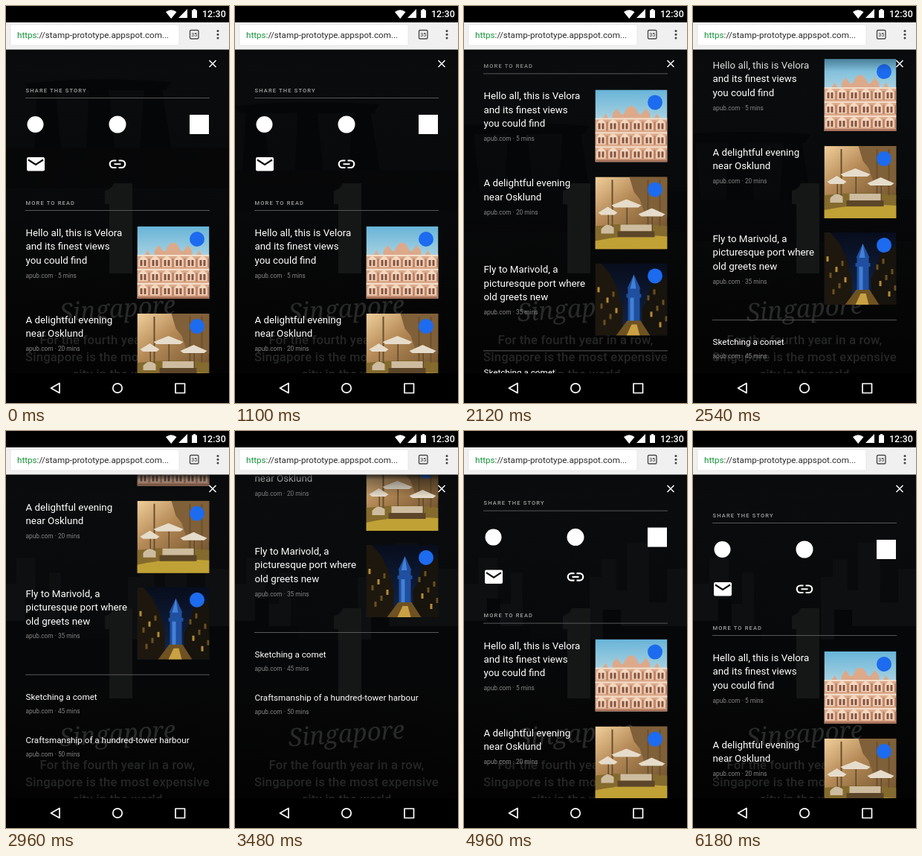
These frames come from a looping animation (300x533 px, 6.2 s). An HTML page:

```html
<!DOCTYPE html>
<html lang="en">
<head>
<meta charset="utf-8">
<title>Story menu</title>
<style>
html, body { margin: 0; width: 100%; height: 100%; overflow: hidden; background: #000; }
svg { display: block; width: 100%; height: 100%; font-family: Roboto, "Open Sans", sans-serif; }
.title { font-size: 13.33px; fill: #fff; }
.small { font-size: 11.67px; fill: #fff; }
.meta { font-size: 8.33px; fill: #858585; }
.head { font-size: 7.5px; font-weight: 500; letter-spacing: 1.17px; fill: #a2a2a2; }
.intro { font-size: 16.67px; font-weight: 500; letter-spacing: .2px; fill: #252626; text-anchor: middle; }
</style>
</head>
<body>
<svg viewBox="0 0 300 533" preserveAspectRatio="none">
  <defs>
    <clipPath id="page"><path d="M0 58H300V493H0z"/></clipPath>
    <clipPath id="photo"><path d="M0 0H97V97H0z"/></clipPath>
    <linearGradient id="dim" x2="0" y2="1"><stop stop-color="#0a0c0d"/><stop offset=".5" stop-color="#08090a"/><stop offset="1" stop-color="#030303"/></linearGradient>
    <linearGradient id="shade" x2="0" y2="1"><stop stop-color="#07090a" stop-opacity=".85"/><stop offset=".25" stop-color="#07090a" stop-opacity=".4"/><stop offset="1" stop-color="#07090a" stop-opacity="0"/></linearGradient>
    <linearGradient id="day" x2="0" y2="1"><stop stop-color="#68b4d8"/><stop offset=".5" stop-color="#b5d8e2"/></linearGradient>
    <linearGradient id="sun" x2=".8" y2="1"><stop stop-color="#f0cf9b"/><stop offset=".4" stop-color="#b58a57"/><stop offset="1" stop-color="#6a4c28"/></linearGradient>
    <linearGradient id="night" x2="0" y2="1"><stop stop-color="#070d1c"/><stop offset="1" stop-color="#14264a"/></linearGradient>
  </defs>

  <g clip-path="url(#page)">
    <path fill="url(#dim)" d="M0 58H300V493H0z"/>
    <g id="bay" fill="#050607">
      <path d="M24 104Q120 94 222 102L214 113H34zM42 113H66L74 190H38zM112 113H138L146 190H108zM186 113H210L222 190H180z"/>
      <path d="M-20 190H380V245H-20z" opacity=".6"/>
    </g>
    <g id="city">
      <path fill="#0d0f11" d="M0 205H22V170H48V232H66V190H82V340H0zM172 196H188V172H208V214H222V150H252V230H276V185H310V340H172z"/>
      <path fill="#060708" d="M0 255H34V225H52V262H92V280H190V240H214V262H310V345H0z"/>
    </g>
    <path fill="#151616" d="M145 238H170V359H139V266H133V248Q142 246 145 238z"/>
    <text x="150" y="418" text-anchor="middle" font-family="'Noto Serif', serif" font-size="33.500" font-style="italic" font-weight="500" fill="#292a2a" transform="rotate(-4 150 408)">Singapore</text>
    <text class="intro" x="150" y="454">For the fourth year in a row,</text>
    <text class="intro" x="150" y="477">Singapore is the most expensive</text>
    <text class="intro" x="150" y="500">city in the world</text>
    <g id="list"></g>
    <path fill="url(#shade)" d="M0 58H300V88H0z"/>
    <path d="M273.500 73L282.500 82M282.500 73L273.500 82" stroke="#fff" stroke-width="1.500"/>
  </g>

  <path d="M0 0H300V22H0z"/>
  <g fill="#fff">
    <path d="M215 8Q222 2.500 229.500 8L222.200 17zM244 4V16H232zM250 5.500H252V4H255V5.500H257V16H250z"/>
    <text x="264" y="14.500" font-size="12.500" font-weight="500">12:30</text>
  </g>

  <path d="M0 22H300V58.500H0z" fill="#f0f0f0"/>
  <rect x="6" y="25" width="227" height="28" rx="1.500" fill="#fff" stroke="#dcdcdc" stroke-width=".6"/>
  <text x="15" y="43" font-size="11.670" fill="#2b2b2b"><tspan fill="#16923a">https</tspan>://stamp-prototype.appspot.com...</text>
  <rect x="247.500" y="32.500" width="11.500" height="11.500" rx="1.500" fill="none" stroke="#4a4a4a" stroke-width="1.400"/>
  <text x="253.250" y="41" font-size="7" font-weight="500" fill="#4a4a4a" text-anchor="middle">35</text>
  <g fill="#444"><circle cx="285" cy="33.500" r="1.500"/><circle cx="285" cy="38.200" r="1.500"/><circle cx="285" cy="42.900" r="1.500"/></g>

  <path d="M0 493H300V533H0z"/>
  <g fill="none" stroke="#fff" stroke-width="1.700" stroke-linejoin="round">
    <path d="M60.500 513L72 506.500V519.500z"/><circle cx="150" cy="513" r="6.200"/><path d="M228 507H240.500V519.500H228z"/>
  </g>
</svg>
<script>
const $ = id => document.getElementById(id);
const text = (kind, y, words) => `<text class="${kind}" x="26.5" y="${y}">${words}</text>`;
const rule = y => `<path d="M26 ${y}H274" stroke="#575757"/>`;
const box = (x, y, w, h, fill) => `<rect x="${x}" y="${y}" width="${w}" height="${h}" fill="${fill}"/>`;
const shape = (d, fill) => `<path d="${d}" fill="${fill}"/>`;

function palace() {
  let s = box(0, 0, 97, 97, 'url(#day)') +
    shape('M0 97V40H9L14 32L19 40H23V33L29 25L35 33H38Q48 10 59 33H62L68 25L74 33V40H78L83 32L88 40H97V97z', '#dca98a');
  for (let row = 0; row < 3; row++) {
    const y = 40 + row * 19;
    s += box(0, y - 2, 97, 2, '#f4dfca');
    for (let x = 2; x < 95; x += 16)
      s += shape(`M${x} ${y + 14}V${y + 5}Q${x + 6} ${y - 5} ${x + 12} ${y + 5}V${y + 14}z`, '#f3d8c0') +
        box(x + 2, y + 5, 3, 8, '#86533f') + box(x + 7, y + 5, 3, 8, '#86533f') +
        box(x + 13, y + 3, 2, 12, '#b67a5f');
  }
  return s + box(0, 94, 97, 3, '#a8735a');
}

function garden() {
  let s = box(0, 0, 97, 97, 'url(#sun)') +
    shape('M46 0H97V54H68L60 30L52 20z', '#806039') +
    shape('M0 66Q50 60 97 66V97H0z', '#846a2d') +
    shape('M0 86Q45 76 97 80V97H0z', '#c0a135');
  for (const x of [22, 70, 86]) s += box(x, 4, 2, 62, '#69502e');
  for (const [x, y, w] of [[4, 48, 26], [22, 38, 40], [58, 50, 36]])
    s += box(x + w / 2, y, 1.5, 28, '#5c4a30') +
      shape(`M${x} ${y}L${x + w / 2} ${y - 8}L${x + w} ${y}L${x + w - 4} ${y + 3}H${x + 4}z`, '#e6dccb');
  return s + shape('M8 70Q16 60 25 68V76H8zM34 64H76V73H34z', '#cdbc9f') + box(30, 73, 50, 8, '#5c4629');
}

function tower() {
  let s = box(0, 0, 97, 97, 'url(#night)') +
    shape('M0 0H8L20 14L30 34L37 60V97H0z', '#1d170e') +
    shape('M97 18L76 28L69 50L63 62V97H97z', '#17130d') +
    shape('M52 15L61 34H43zM44 34H60V41H62V46H42V41H44zM44 46H60V80H44z', '#1f4f9f') +
    shape('M52 15L55 34H47zM47 46H52V80H47z', '#4380d6');
  for (let i = 0; i < 14; i++)
    s += box(i % 2 ? 68 + i * 2 : 3 + i * 2, 32 + i * 11 % 52, 3, 7, i % 3 ? '#6b5120' : '#b48c38');
  return s + shape('M28 97L43 77H61L74 97z', '#6e5222') + shape('M42 97L49 82H56L60 97z', '#c9a144');
}

function story(top, lines, mins, art) {
  const base = top + 13;
  return lines.map((line, i) => text('title', base + i * 18.4, line)).join('') +
    text('meta', base + (lines.length - 1) * 18.4 + 18.8, `apub.com · ${mins} mins`) +
    `<g transform="translate(176.500 ${top})" clip-path="url(#photo)">${art}<circle cx="80.5" cy="17" r="10" fill="#1d6bee"/></g>`;
}

const brief = (y, title, mins) => text('small', y, title) + text('meta', y + 18, `apub.com · ${mins} mins`);

$('list').innerHTML =
  text('head', 115.7, 'SHARE THE STORY') + rule(123.5) +
  '<g fill="#fff"><circle cx="39.5" cy="159" r="11"/><circle cx="150" cy="159" r="11.5"/><rect x="247" y="146" width="26" height="26"/>' +
  '<rect x="28" y="203" width="24" height="18.5" rx="2"/></g>' +
  '<path d="M30 206.500L40 213L50 206.500" fill="none" stroke="#0a0b0c" stroke-width="2.200"/>' +
  '<path d="M148.500 207.500H144.500A4.700 4.700 0 0 0 144.500 217H148.500M151.500 207.500H155.500A4.700 4.700 0 0 1 155.500 217H151.500M145.500 212.250H154.500" fill="none" stroke="#fff" stroke-width="2.200"/>' +
  text('head', 266.7, 'MORE TO READ') + rule(274.5) +
  story(296, ['Hello all, this is Velora', 'and its finest views', 'you could find'], 5, palace()) +
  story(413, ['A delightful evening', 'near Osklund'], 20, garden()) +
  story(529, ['Fly to Marivold, a', 'picturesque port where', 'old greets new'], 35, tower()) +
  rule(646.5) +
  brief(680, 'Sketching a comet', 45) +
  brief(738, 'Craftsmanship of a hundred-tower harbour', 50);

// Three swipes: start, duration, distance.
const swipes = [[1360, 1200, 225], [2560, 900, 151], [3800, 1390, -376]];

// Bezier ease-out (0, 0, .58, 1), solved by bisection.
function easeOut(x) {
  if (x <= 0) return 0;
  if (x >= 1) return 1;
  let lo = 0, hi = 1;
  for (let i = 0; i < 16; i++) {
    const s = (lo + hi) / 2;
    if (1.74 * s * s * (1 - s) + s ** 3 < x) lo = s; else hi = s;
  }
  return lo * lo * (3 - 2 * lo);
}

const scrollAt = t => swipes.reduce((y, [start, span, dist]) => y + dist * easeOut((t - start) / span), 0);

function draw(now) {
  const t = now % 6200, first = t < 2900;
  $('list').setAttribute('transform', `translate(0 ${-scrollAt(t)})`);
  $('bay').setAttribute('transform', `translate(${-t / 40} ${t / 36})`);
  $('city').setAttribute('transform', `translate(${(t - 6200) / 400} 0)`);
  $('bay').style.display = first ? '' : 'none';
  $('city').style.display = first ? 'none' : '';
}

const start = performance.now();
function tick() {
  draw(performance.now() - start);
  requestAnimationFrame(tick);
}
tick();
</script>
</body>
</html>
```
